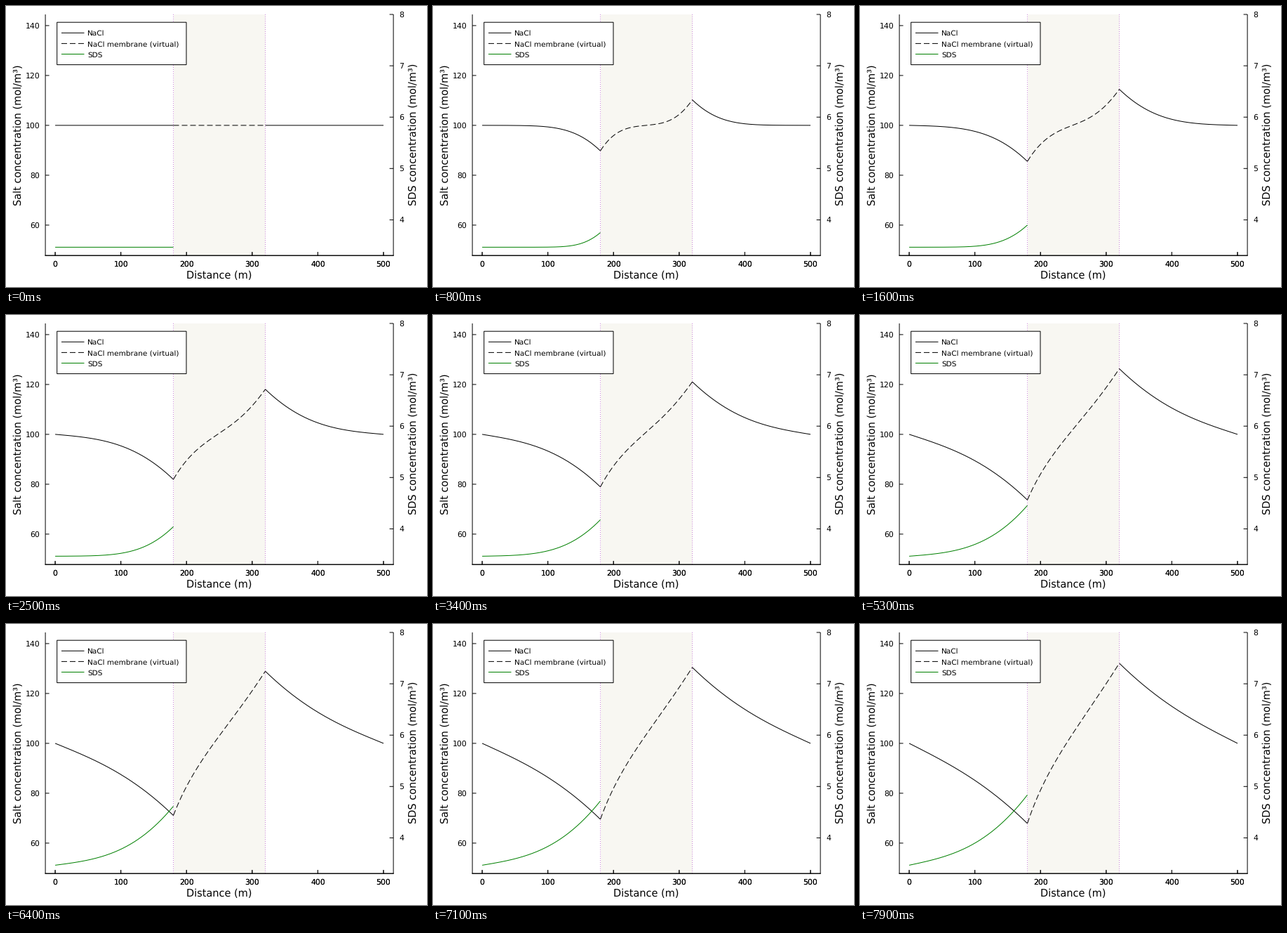
Animation of 600x400 px, one loop 8000 ms. Source, as a matplotlib script:

```python
import math

import numpy as np
import matplotlib.pyplot as plt
from matplotlib.animation import FuncAnimation
from matplotlib.patches import Rectangle

plt.rcParams["text.hinting"] = "none"

W, H, DPI = 600, 400, 100
FRAMES, INTERVAL = 80, 100
PX = 72 / DPI  # one pixel in points

LEFT, RIGHT, TOP, BOTTOM = 56.1, 552.1, 12, 355.2
WALL_A, WALL_B, END = 180, 320, 500  # membrane faces and domain end
D_SALT, D_SDS, D_MEM = 1610, 680, 670  # diffusivities
POWER = 2.5  # this power of the membrane concentration diffuses
SALT0, SDS0 = 100, 3.467

erfc = np.vectorize(math.erfc)


def px(x):
    return 70.1 + 0.9358 * x


def py_salt(c):
    return 169.9 - 3.55 * (c - 100)


def py_sds(c):
    return 12 + 73.1 * (8 - c)


def inerfc(n, z):
    """n-fold repeated integral of erfc."""
    if n == -1:
        return 2 / math.sqrt(math.pi) * np.exp(-z * z)
    if n == 0:
        return erfc(z)
    return (inerfc(n - 2, z) / 2 - z * inerfc(n - 1, z)) / n


def kernel(n, z):
    """Response to a boundary value growing as t**(n/2)."""
    return inerfc(n, z) / inerfc(n, np.zeros(1))


def slab(n, d, length, diff, t, sign):
    """Sum of mirror images at distance d from the driven face."""
    s = 2 * math.sqrt(diff * t)
    return sum(sign**k * (kernel(n, (2 * k * length + d) / s)
                          - kernel(n, (2 * (k + 1) * length - d) / s))
               for k in range(2))


def bulk_shape(d, diff, t):
    shape = slab(1, d, END - WALL_B, diff, t, -1)
    return shape / shape[0]


dist = np.linspace(0, WALL_A, 181)
x_mem = np.linspace(0, WALL_B - WALL_A, 141)


def membrane_salt(amp, t):
    """Membrane profile for face values SALT0 - amp and SALT0 + amp."""
    width = WALL_B - WALL_A
    u, coef = 1 + 0 * x_mem, 1
    for n in range(1, 4):
        coef *= (POWER - n + 1) / n * amp / SALT0
        near = slab(n, x_mem, width, D_MEM, t, 1)
        u = u + coef * ((-1)**n * near + near[::-1])
    return SALT0 * u ** (1 / POWER)


def profiles(t):
    """Salt deviation, membrane salt and SDS profile at time t."""
    if t == 0:
        return 0 * dist, SALT0 + 0 * x_mem, SDS0 + 0 * dist
    r = math.sqrt(t)
    amp = 11.43 * r
    rise = 0.2865 * r + 0.0194 * t + 0.0185 * t * r
    return (amp * bulk_shape(dist, D_SALT, t), membrane_salt(amp, t),
            SDS0 + rise * bulk_shape(dist, D_SDS, t))


fig = plt.figure(figsize=(W / DPI, H / DPI), dpi=DPI, facecolor="white")
ax = fig.add_axes([0, 0, 1, 1])
ax.set_xlim(0, W)
ax.set_ylim(H, 0)
ax.axis("off")


def line(xs, ys, color="black", z=3, **kw):
    return ax.plot(xs, ys, color=color, lw=PX, zorder=z, snap=False,
                   solid_capstyle="butt", dash_capstyle="butt", **kw)[0]


def label(x, y, s, size, **kw):
    return ax.text(x, y, s, fontsize=size * PX, va="baseline", zorder=6,
                   family="DejaVu Sans", color="black", **kw)


DASH = (0, (8, 4))
DOT = (0, (1, 2))

# membrane region
ax.add_patch(Rectangle((px(WALL_A), TOP), px(WALL_B) - px(WALL_A),
                       BOTTOM - TOP, fc="#f8f7f2", ec="none", zorder=1))
for wall in (WALL_A, WALL_B):
    line([px(wall)] * 2, [TOP, BOTTOM], "#cb84dc", z=2, ls=DOT)

# axes; the x axis is shared, so it is drawn once per y axis
line([LEFT, LEFT], [TOP, BOTTOM])
line([RIGHT, RIGHT], [TOP, BOTTOM])
for _ in range(2):
    line([LEFT - 0.5, RIGHT + 0.5], [BOTTOM, BOTTOM])
    for v in range(0, 501, 100):
        line([px(v)] * 2, [BOTTOM, BOTTOM - 5])
        label(px(v), 371, str(v), 10.9, ha="center")
for v in range(60, 141, 20):
    y = py_salt(v)
    line([LEFT, LEFT + 5.5], [y, y])
    label(48.3, y + 4, str(v), 10.9, ha="right")
for v in range(4, 9):
    y = py_sds(v)
    line([RIGHT, RIGHT - 5.5], [y, y])
    label(560, y + 4, str(v), 10.9, ha="left")

label(304, 388.3, "Distance (m)", 14.5, ha="center")
for x, name in ((22, "Salt"), (585, "SDS")):
    label(x, 183.2, f"{name} concentration (mol/m³)", 14.5, ha="center",
          rotation=90, rotation_mode="anchor")

# legend
ax.add_patch(Rectangle((72.7, 23.2), 184.3, 60.4, fc="white", ec="black",
                       lw=PX, zorder=5, snap=False))
for y, name, color, style in ((38.3, "NaCl", "black", "-"),
                              (53.4, "NaCl membrane (virtual)", "black", DASH),
                              (68.5, "SDS", "green", "-")):
    line([79, 111.5], [y, y], color, z=6, ls=style)
    label(116, y + 4, name, 10.5, ha="left")

# curves
left = line([], [], z=4)
membrane = line([], [], z=4, ls=DASH)
right = line([], [], z=4)
sds = line([], [], "green", z=4)


def update(i):
    salt, mem, surf = profiles(i * INTERVAL / 1000)
    left.set_data(px(WALL_A - dist), py_salt(SALT0 - salt))
    right.set_data(px(WALL_B + dist), py_salt(SALT0 + salt))
    membrane.set_data(px(WALL_A + x_mem), py_salt(mem))
    sds.set_data(px(WALL_A - dist), py_sds(surf))
    return left, membrane, right, sds


anim = FuncAnimation(fig, update, frames=FRAMES, interval=INTERVAL,
                     init_func=lambda: update(0), repeat=True,
                     repeat_delay=0, blit=False)
plt.show()
```
